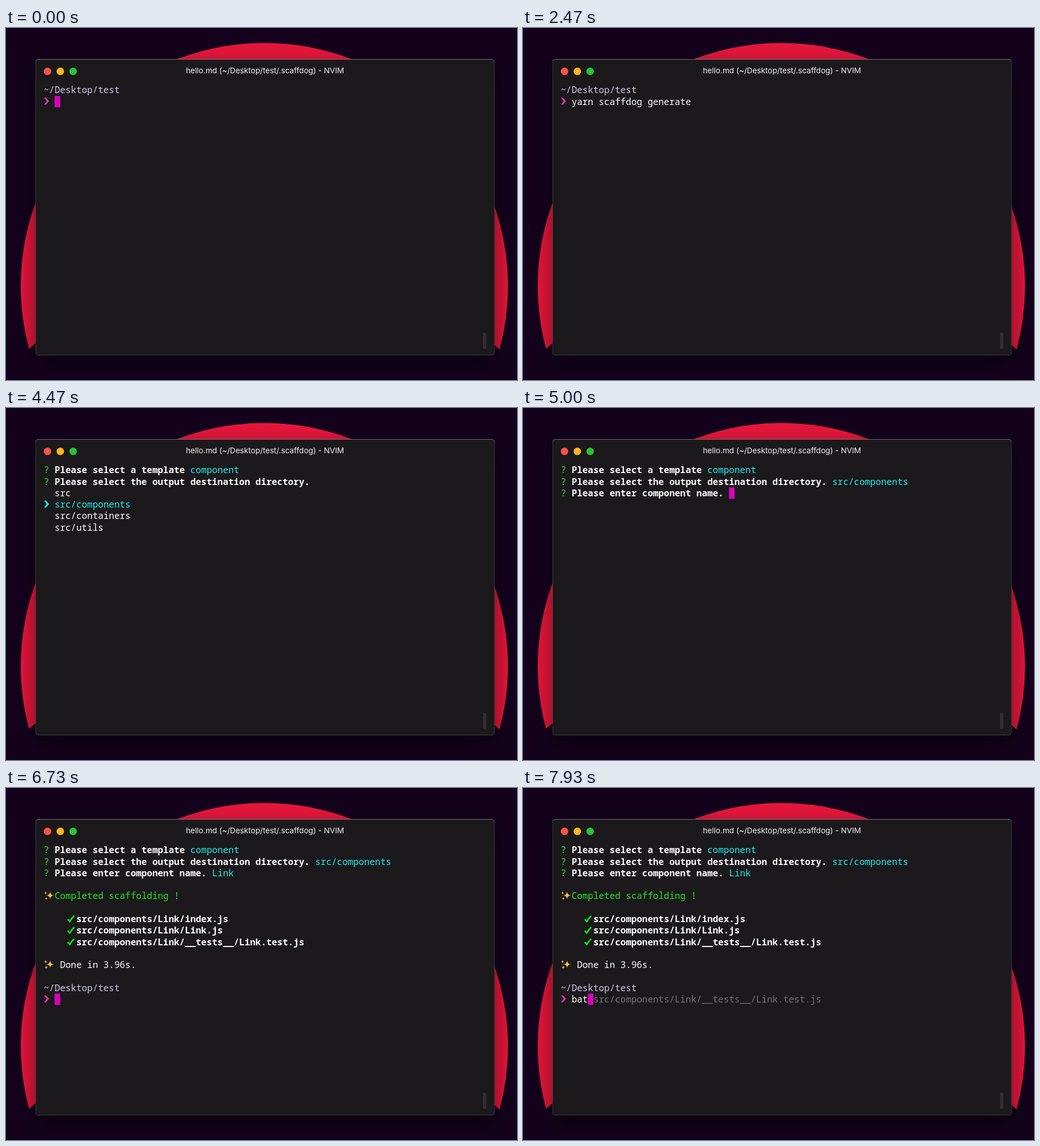
Animation of 901x622 px, one loop 8 s. Source, as an HTML page with a canvas:

```html
<!DOCTYPE html>
<html lang="en">
<head>
<meta charset="utf-8">
<title>Terminal</title>
<style>
html, body { margin: 0; width: 100%; height: 100%; overflow: hidden; background: #14021d; }
canvas { display: block; }
</style>
</head>
<body>
<canvas id="stage" width="901" height="622"></canvas>
<script>
const ctx = document.getElementById('stage').getContext('2d');
const LOOP = 8000, LEFT = 66.5, TOP = 99.7, CELL = 9.576, ROW = 20.27;
const WHITE = '#fffdff', GREY = '#757376', CYAN = '#1ff0f2', GREEN = '#22e826',
      LAVENDER = '#d3c6ee', PINK = '#ed35bd', CURSOR = '#dc00b9';
const FILE = 'src/components/Link/__tests__/Link.test.js';

const colX = col => LEFT + col * CELL;
const rowY = row => TOP + row * ROW;

// Number of key presses done at time t
const typed = (t, times) => times.filter(k => t >= k).length;

function shape(points, color) {
  ctx.fillStyle = color;
  ctx.beginPath();
  points.forEach(([x, y]) => ctx.lineTo(x, y));
  ctx.fill();
}

function disc(x, y, r, color) {
  ctx.fillStyle = color;
  ctx.beginPath();
  ctx.arc(x, y, r, 0, 7);
  ctx.fill();
}

function box(x, y, w, h, r, color) {
  ctx.fillStyle = color;
  ctx.beginPath();
  ctx.roundRect(x, y, w, h, r);
  ctx.fill();
}

function write(row, col, text, color = WHITE, weight = 400) {
  ctx.font = `${weight} 15.96px "Noto Sans Mono", monospace`;
  ctx.textAlign = 'left';
  ctx.fillStyle = color;
  ctx.fillText(text, colX(col), rowY(row) + 15.7);
}

function cursor(row, col, letter = '') {
  ctx.fillStyle = CURSOR;
  ctx.fillRect(colX(col), rowY(row) + .1, CELL + .2, 20);
  write(row, col, letter, '#560049');
}

function arrow(row, color) {
  const y = rowY(row) + 9.3;
  shape([[67.2, y - 6.2], [70.2, y - 6.2], [75.8, y], [70.2, y + 6.2], [67.2, y + 6.2], [71.8, y]], color);
}

function star(x, y, r) {
  ctx.fillStyle = '#f6bd50';
  ctx.beginPath();
  ctx.moveTo(x, y - r);
  for (let i = 1; i <= 4; i++) {
    const a = i * Math.PI / 2, m = a - Math.PI / 4, k = r * .08;
    ctx.quadraticCurveTo(x + k * Math.sin(m), y - k * Math.cos(m),
      x + r * Math.sin(a), y - r * Math.cos(a));
  }
  ctx.fill();
}

function sparkles(row) {
  const y = rowY(row) + 9;
  star(77.8, y, 7);
  star(69.8, y - 4.5, 2.8);
  star(71, y + 5.5, 2.8);
}

function check(row) {
  const y = rowY(row) + 10;
  ctx.strokeStyle = '#08ef18';
  ctx.lineWidth = 2.7;
  ctx.beginPath();
  ctx.moveTo(108.8, y + .6);
  ctx.lineTo(112.5, y + 4.6);
  ctx.quadraticCurveTo(115.5, y - 1, 120.3, y - 5.5);
  ctx.stroke();
}

function question(row, text, answer, color = CYAN) {
  write(row, 0, '?', GREEN);
  write(row, 2, text, WHITE, 700);
  write(row, text.length + 3, answer, color);
}

// Shell prompt with n typed letters and the rest as a suggestion
function prompt(row, command, n, showCursor = true) {
  write(row, 0, '~/Desktop/test', LAVENDER);
  arrow(row + 1, PINK);
  write(row + 1, 2, command.slice(0, n));
  if (n) write(row + 1, n + 3, command.slice(n + 1), GREY);
  if (showCursor) cursor(row + 1, n + 2, n ? command[n] || '' : '');
}

function choices(row, items, active) {
  items.forEach((item, i) => write(row + i, 2, item, i === active ? CYAN : WHITE));
  arrow(row + active, CYAN);
}

function terminal(t) {
  if (t < 2930) {
    const n = t < 1600 ? typed(t, [670, 870, 1000, 1130, 1330]) : 22;
    prompt(0, 'yarn scaffdog generate', n, t < 2270);
    return;
  }
  if (t < 3670) {
    question(0, 'Please select a template', '(Use arrow keys)', GREY);
    choices(1, ['component'], 0);
    return;
  }
  question(0, 'Please select a template', 'component');
  const where = 'Please select the output destination directory.';
  if (t < 4930) {
    const moved = typed(t, [4200]);
    question(1, where, moved ? '' : '(Use arrow keys)', GREY);
    choices(2, ['src', 'src/components', 'src/containers', 'src/utils'], moved);
    return;
  }
  question(1, where, 'src/components');
  const ask = 'Please enter component name.';
  if (t < 6400) {
    const n = typed(t, [5530, 5730, 5930, 6070]);
    question(2, ask, 'Link'.slice(0, n), WHITE);
    cursor(2, 31 + n);
    return;
  }
  question(2, ask, 'Link');
  sparkles(4);
  write(4, 2, 'Completed scaffolding !', GREEN);
  ['index.js', 'Link.js', '__tests__/Link.test.js'].forEach((name, i) => {
    check(6 + i);
    write(6 + i, 6, 'src/components/Link/' + name, WHITE, 700);
  });
  if (t < 6470) return;
  sparkles(10);
  write(10, 3, 'Done in 3.96s.');
  prompt(12, 'bat ' + FILE, typed(t, [7400, 7600, 7800]));
}

function backdrop() {
  ctx.fillStyle = '#14021d';
  ctx.fillRect(0, 0, 901, 622);
  ctx.fillStyle = '#e5163b';
  ctx.beginPath();
  ctx.arc(455.6, 456, 429.6, Math.PI - .261, .264);
  ctx.lineTo(800, 507);
  ctx.lineTo(112, 508);
  ctx.fill();

  ctx.save();
  ctx.shadowColor = 'rgba(0,0,0,.5)';
  ctx.shadowBlur = 38;
  ctx.shadowOffsetY = 16;
  box(52, 55, 809.5, 523.5, 5, '#1b191b');
  ctx.restore();
  const edge = ctx.createLinearGradient(0, 55, 0, 62);
  edge.addColorStop(0, '#7b6d72');
  edge.addColorStop(1, '#3b383c');
  box(52, 55, 809.5, 523.5, 5, edge);
  box(53, 56, 807.5, 521.5, 4, '#1b191b');

  ['#ff5249', '#ffb420', '#27c538'].forEach((c, i) => disc(73.2 + i * 22.6, 76.6, 6.6, c));
  ctx.font = '13.6px Inter, sans-serif';
  ctx.textAlign = 'center';
  ctx.fillStyle = '#f5f3f5';
  ctx.fillText('hello.md (~/Desktop/test/.scaffdog) - NVIM', 456.7, 80.3);
  box(841, 538.5, 6, 28.5, 2, '#302e30');
}

function frame(now) {
  backdrop();
  terminal(now % LOOP);
  requestAnimationFrame(frame);
}
frame(0);
</script>
</body>
</html>
```
